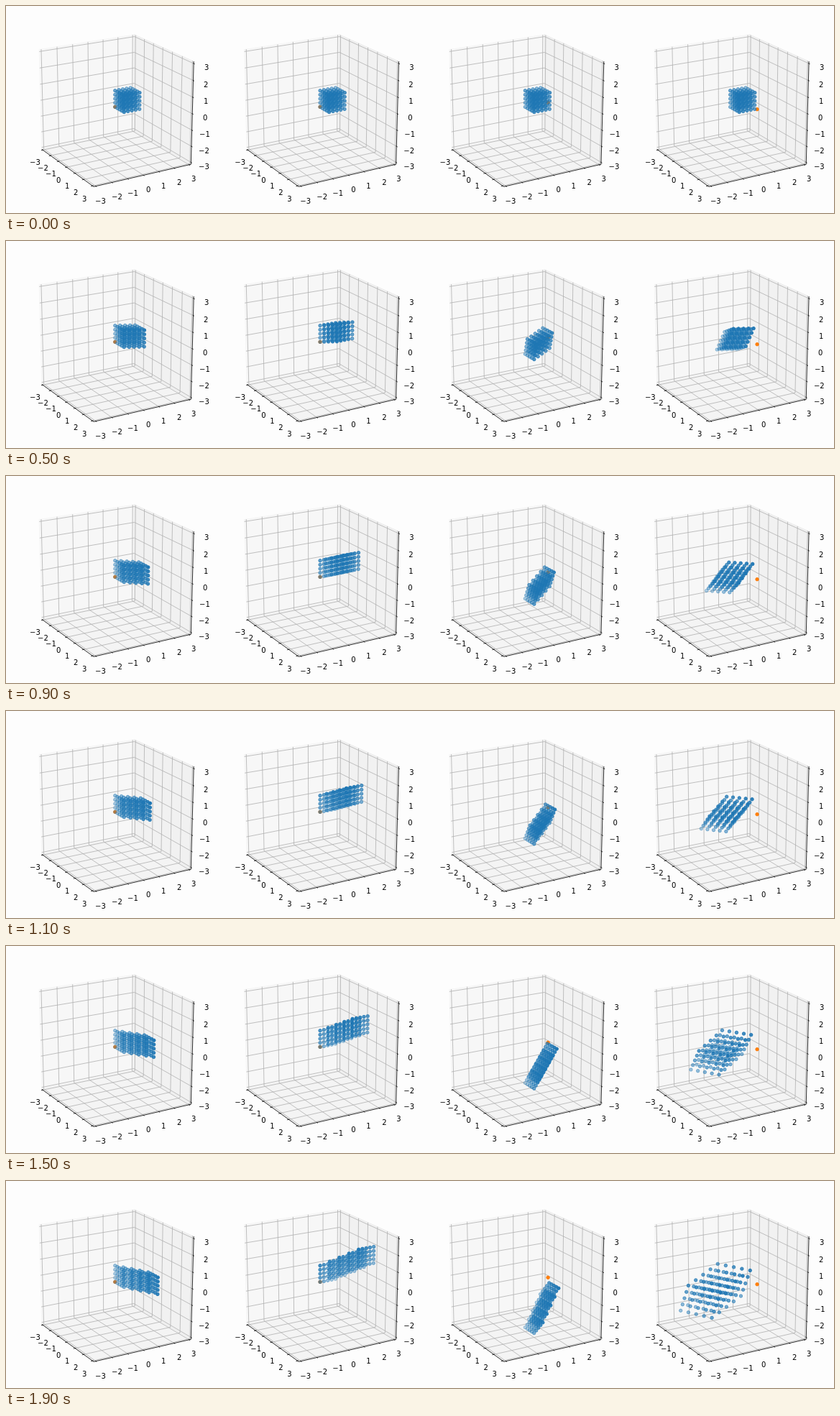
Write an HTML page with a canvas that moves like this. It is 1152 px wide and 288 px high and loops after 2 s.

```html
<!DOCTYPE html>
<html lang="en">
<head>
<meta charset="utf-8">
<title>Shearing point cubes</title>
<style>
  html, body { margin: 0; width: 1152px; height: 288px; overflow: hidden; background: #fdfdfd; }
  canvas { display: block; }
</style>
</head>
<body>
<canvas id="stage" width="1152" height="288"></canvas>
<script>
const ctx = document.getElementById('stage').getContext('2d');

const PITCH = 285.3, CENTER = [151.76, 140.4], SCALE = [1483.8, 1440];
const AZIM = -Math.PI / 6, ELEV = Math.PI / 9, DIST = 10;
const RANGE = 6, EDGE = 3.125, LABEL_GAP = 0.51;
const CORNER = [-EDGE, EDGE, -EDGE];          // where the three panes meet
const BLUE = '#1f77b4', ORANGE = '#ff7f0e';

// Each panel: the shear applied at strength k, and its marked point.
const panels = [
  { mark: [0, 0, 0],     shear: (x, y, z, k) => [x + k * y, y, z] },
  { mark: [0, 0, 0],     shear: (x, y, z, k) => [x, y + k * x, z + k * x / 2] },
  { mark: [0, 1.5, 0],   shear: (x, y, z, k) => [x + k * z / 2, y, z + k * (y - 1.5)] },
  { mark: [1.1, 1.1, 0], shear: (x, y, z, k) => [x + k * (y - 1.1), y + k * (z - 1.1), z + k * (x - 1.1)] },
];

const cube = [];
for (let i = 0; i < 125; i++) cube.push([(i / 25 | 0) / 4, (i / 5 | 0) % 5 / 4, i % 5 / 4]);

// Perspective projection to [x, y, depth] on the panel.
function project(point) {
  const [x, y, z] = point.map(v => v / RANGE);
  const right = -Math.sin(AZIM) * x + Math.cos(AZIM) * y;
  const near = Math.cos(AZIM) * x + Math.sin(AZIM) * y;
  const up = z * Math.cos(ELEV) - near * Math.sin(ELEV);
  const depth = DIST - near * Math.cos(ELEV) - z * Math.sin(ELEV);
  return [CENTER[0] + SCALE[0] * right / depth, CENTER[1] - SCALE[1] * up / depth, depth];
}

// Copy of a point with some coordinates replaced.
const withAxis = (point, changes) => Object.assign([...point], changes);

function trace(points) {
  ctx.beginPath();
  for (const p of points) ctx.lineTo(...project(p).slice(0, 2));
}

function line(points, color) {
  trace(points);
  ctx.strokeStyle = color;
  ctx.lineWidth = 0.8;
  ctx.stroke();
}

function drawPane(axis, level) {
  const [a, b] = [0, 1, 2].filter(i => i !== axis);
  trace([[-1, -1], [1, -1], [1, 1], [-1, 1]].map(([u, v]) =>
    withAxis(CORNER, { [a]: u * EDGE, [b]: v * EDGE })));
  ctx.closePath();
  ctx.fillStyle = ctx.strokeStyle = `rgba(${level},${level},${level},0.5)`;
  ctx.lineWidth = 1;
  ctx.fill();
  ctx.stroke();
}

function drawAxis(axis, edge, tickAxis) {
  const [a, b] = [0, 1, 2].filter(i => i !== axis);
  for (let t = -3; t <= 3; t++) {
    const base = withAxis(CORNER, { [axis]: t });
    line([withAxis(base, { [a]: -base[a] }), base, withAxis(base, { [b]: -base[b] })], '#b0b0b0');
  }
  line([-EDGE, EDGE].map(v => withAxis(edge, { [axis]: v })), '#000');
  ctx.fillStyle = '#000';
  for (let t = -3; t <= 3; t++) {
    const base = withAxis(edge, { [axis]: t });
    const side = Math.sign(base[tickAxis]);
    line([-0.05, 0.1].map(d => withAxis(base, { [tickAxis]: base[tickAxis] + side * d })), '#000');
    const away = i => base[i] + Math.sign(base[i]) * LABEL_GAP;
    const [x, y] = project(withAxis(base, { [a]: away(a), [b]: away(b) }));
    const text = String(t).replace('-', '\u2212');
    ctx.fillText(text, Math.round(x - ctx.measureText(text).width / 2), Math.round(y + 7.6));
  }
}

function drawDot([x, y], color, alpha) {
  ctx.beginPath();
  ctx.arc(x, y, Math.sqrt(20) / 2, 0, 2 * Math.PI);
  ctx.globalAlpha = alpha;
  ctx.fillStyle = ctx.strokeStyle = color;
  ctx.lineWidth = 1;
  ctx.fill();
  ctx.stroke();
  ctx.globalAlpha = 1;
}

function drawPanel({ mark, shear }, k) {
  drawPane(0, 242);
  drawPane(1, 230);
  drawPane(2, 236);
  drawAxis(0, [0, -EDGE, -EDGE], 1);
  drawAxis(1, [EDGE, 0, -EDGE], 0);
  drawAxis(2, [EDGE, EDGE, 0], 0);

  drawDot(project(mark), ORANGE, 1);
  const dots = cube.map(p => project(shear(...p, k)));
  const depths = dots.map(d => d[2]);
  const near = Math.min(...depths), far = Math.max(...depths);
  for (const dot of dots) drawDot(dot, BLUE, 1 - 0.7 * (dot[2] - near) / (far - near));
}

let shown = -1;
function frame() {
  const step = Math.floor(performance.now() / 100) % 20;
  if (step !== shown) {
    shown = step;
    ctx.fillStyle = '#fdfdfd';
    ctx.fillRect(0, 0, 1152, 288);
    ctx.font = '10px "DejaVu Sans", sans-serif';
    panels.forEach((panel, i) => {
      ctx.save();
      ctx.translate(i * PITCH, 0);
      drawPanel(panel, step / 10);
      ctx.restore();
    });
  }
  requestAnimationFrame(frame);
}
frame();
</script>
</body>
</html>
```
